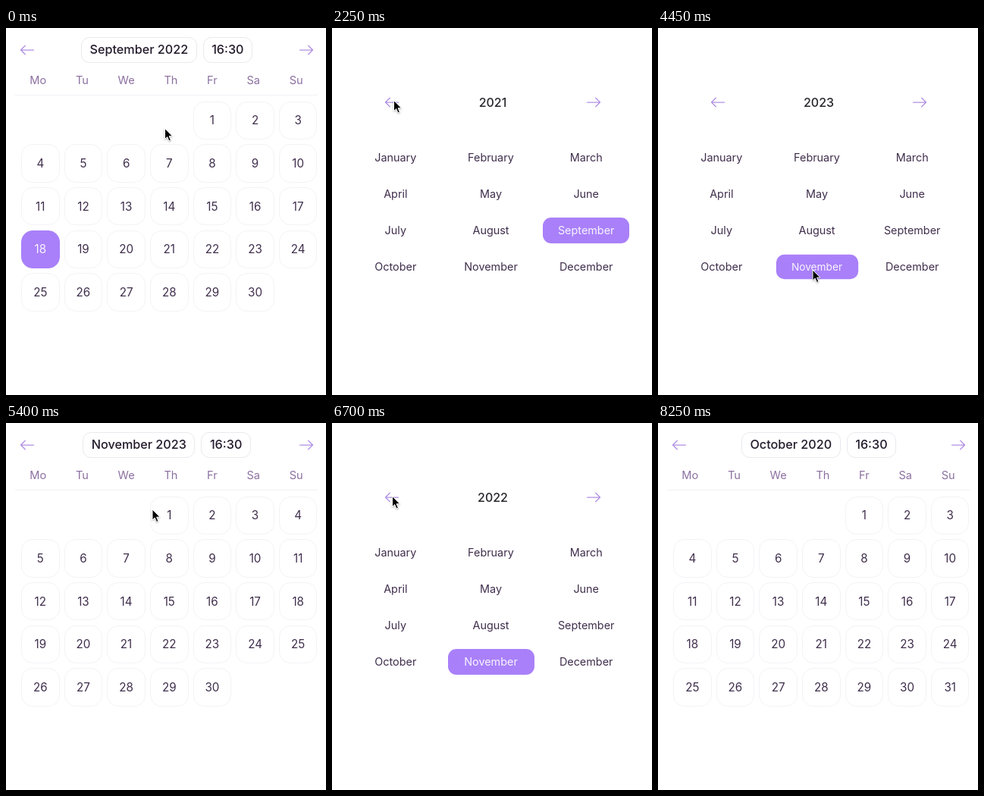
These frames come from a looping animation (422 by 484 pixels, 8600 ms). An HTML page:

```html
<!DOCTYPE html>
<html lang="en">
<head>
<meta charset="utf-8">
<title>Date picker</title>
<style>
  html, body { margin: 0; width: 100%; height: 100%; overflow: hidden; background: #fff; }
  body { position: relative; font-family: Inter, "Liberation Sans", sans-serif; color: #3f2e4c; }
  .view { position: absolute; left: 0; top: 0; width: 422px; height: 484px; }
  #months { transform-origin: 211px 214px; }
  .box { position: absolute; box-sizing: border-box; display: flex; align-items: center;
         justify-content: center; white-space: nowrap; }
  .day { font-size: 15.2px; border: 1px solid #f4f2f6; border-radius: 15px; }
  .month { font-size: 14.4px; border-radius: 11px; }
  .year { font-size: 16px; font-weight: 500; color: #29262d; }
  .on { background: #a980f9; border-color: #a980f9; color: #f8f4ff; }
  .head { position: absolute; left: 0; top: 12px; width: 424px; display: flex;
          justify-content: center; gap: 8px; }
  .head div { box-sizing: border-box; height: 34px; padding: 0 10.5px; border: 1px solid #ebe8ee;
              border-radius: 11px; font-size: 16.2px; font-weight: 500; line-height: 31px;
              color: #231a2b; white-space: nowrap; }
  .week { position: absolute; left: 12px; top: 49px; width: 399px; height: 40px; display: flex;
          box-sizing: border-box; border-bottom: 1px solid #f1eff3; color: #8c70a0;
          font-size: 14.6px; line-height: 40px; text-align: center; }
  .week span { flex: 1 1 auto; }
  svg { position: absolute; left: 0; top: 0; overflow: visible; }
  .arrow { fill: none; stroke: #b08fe3; stroke-width: 1.25; stroke-linecap: round; stroke-linejoin: round; }
  #cursor { filter: drop-shadow(0 1px 1px rgba(0, 0, 0, .3)); }
</style>
</head>
<body>
<div id="calendar" class="view">
  <div class="head"><div id="title"></div><div>16:30</div></div>
  <div class="week"><span>Mo</span><span>Tu</span><span>We</span><span>Th</span><span>Fr</span><span>Sa</span><span>Su</span></div>
</div>
<div id="months" class="view"></div>
<svg id="cursor" width="14" height="20">
  <path d="M.5 .5V14.6L3.7 11.6L6 17L8.4 16L6.1 10.7H10.5Z" fill="#000" stroke="#fff" stroke-width="1"/>
</svg>
<script>
const LOOP = 8600, STEP = 50, FADE = 300, EXIT = 8250;
const SEP = 8, OCT = 9, NOV = 10;
const MONTHS = ['January', 'February', 'March', 'April', 'May', 'June', 'July',
  'August', 'September', 'October', 'November', 'December'];

const $ = id => document.getElementById(id);
const calendar = $('calendar'), months = $('months'), title = $('title'), cursor = $('cursor');

function box(parent, cls, x, y, w, h, text = '') {
  const el = document.createElement('div');
  el.className = 'box ' + cls;
  el.style.cssText = `left:${x - w / 2}px;top:${y - h / 2}px;width:${w}px;height:${h}px`;
  el.textContent = text;
  parent.append(el);
  return el;
}

function arrow(parent, x, y, dir) {
  const el = box(parent, '', x, y, 18, 14);
  el.innerHTML = `<svg width="18" height="14"><path class="arrow"
    transform="translate(9 7) scale(${dir} 1)" d="M-8.5 0H8.5M2.7 -5.8L8.5 0L2.7 5.8"/></svg>`;
  return el;
}

arrow(calendar, 28, 29, -1);
arrow(calendar, 396, 29, 1);
const cells = Array.from({ length: 35 }, (_, i) =>
  box(calendar, 'day', 45.3 + 56.65 * (i % 7), 121.8 + 56.65 * Math.floor(i / 7), 50.5, 50.5));

const prev = arrow(months, 79, 98, -1);
const next = arrow(months, 345, 98, 1);
const year = box(months, 'year', 212, 98, 60, 24);
const names = MONTHS.map((name, i) =>
  box(months, 'month', 83.8 + 125.7 * (i % 3), 170.5 + 48 * Math.floor(i / 3), 114, 34, name));

// everything on screen follows from these clicks
const CLICKS = [
  [1000, title], [2250, prev], [3450, next], [3700, next], [4350, names[NOV]],
  [5850, title], [6700, prev], [6850, prev], [7000, prev], [7600, names[OCT]]
];

// cursor moves: from, until, x, y
const HOME = [209, 132];
const MOVES = [
  [50, 250, 204, 130], [350, 800, 174, 33], [1250, 1850, 85, 202], [1850, 2050, 81, 95],
  [2600, 3250, 353, 99], [3750, 4200, 203.5, 318.5], [4950, 5650, 188, 29],
  [5850, 6100, 132.5, 79.5], [6100, 6550, 79, 96], [7200, 7500, 104.5, 318],
  [7650, 7850, 16, 334], [7850, EXIT, 14, 442]
];

const clamp = x => Math.max(0, Math.min(1, x));
const smooth = x => x * x * (3 - 2 * x);
const easeOut = x => 1 - (1 - x) ** 2;

function cursorAt(t) {
  let [x, y] = HOME;
  for (const [from, until, toX, toY] of MOVES) {
    const k = smooth(clamp((t - from) / (until - from)));
    x += (toX - x) * k;
    y += (toY - y) * k;
  }
  return [x, y];
}

function stateAt(t) {
  const s = { year: 2022, month: SEP, page: new Date(2022, SEP, 1), list: 0 };
  for (const [at, el] of CLICKS) {
    if (at > t) break;
    const fade = delay => easeOut(clamp((t - at - delay) / FADE));
    if (el === prev) s.year--;
    else if (el === next) s.year++;
    else if (el === title) s.list = fade(50);
    else {
      s.month = names.indexOf(el);
      s.page = new Date(s.year, s.month, 1);
      s.list = 1 - fade(100);
    }
  }
  return s;
}

let shown;
function showPage(date) {
  if (+date === shown) return;
  shown = +date;
  const y = date.getFullYear(), m = date.getMonth();
  const days = new Date(y, m + 1, 0).getDate();
  title.textContent = `${MONTHS[m]} ${y}`;
  cells.forEach((cell, i) => {
    const day = i - date.getDay() + 1;
    cell.textContent = day;
    cell.style.display = day > 0 && day <= days ? '' : 'none';
    cell.classList.toggle('on', day === 18 && m === SEP);
  });
}

// a clicked element dips to 95 % and comes back
function press(el, t) {
  const depth = Math.max(0, ...CLICKS.filter(c => c[1] === el).map(([at]) =>
    Math.min(clamp((t - at) / 100), clamp((at + 210 - t) / 100))));
  el.style.transform = `scale(${1 - .05 * depth})`;
}

function render(t) {
  const s = stateAt(t);
  showPage(s.page);
  year.textContent = s.year;
  names.forEach((el, i) => el.classList.toggle('on', i === s.month));
  new Set(CLICKS.map(c => c[1])).forEach(el => press(el, t));

  calendar.style.opacity = 1 - s.list;
  months.style.opacity = s.list;
  months.style.transform = s.list < 1 ? `scale(${1.1 - .1 * s.list})` : 'none';

  const [x, y] = cursorAt(t);
  cursor.style.display = t < EXIT ? '' : 'none';
  cursor.style.transform = `translate(${x}px, ${y}px)`;
}

const start = performance.now();
function tick() {
  const t = (performance.now() - start) % LOOP;
  render(Math.floor(t / STEP) * STEP);
  requestAnimationFrame(tick);
}
tick();
</script>
</body>
</html>
```
